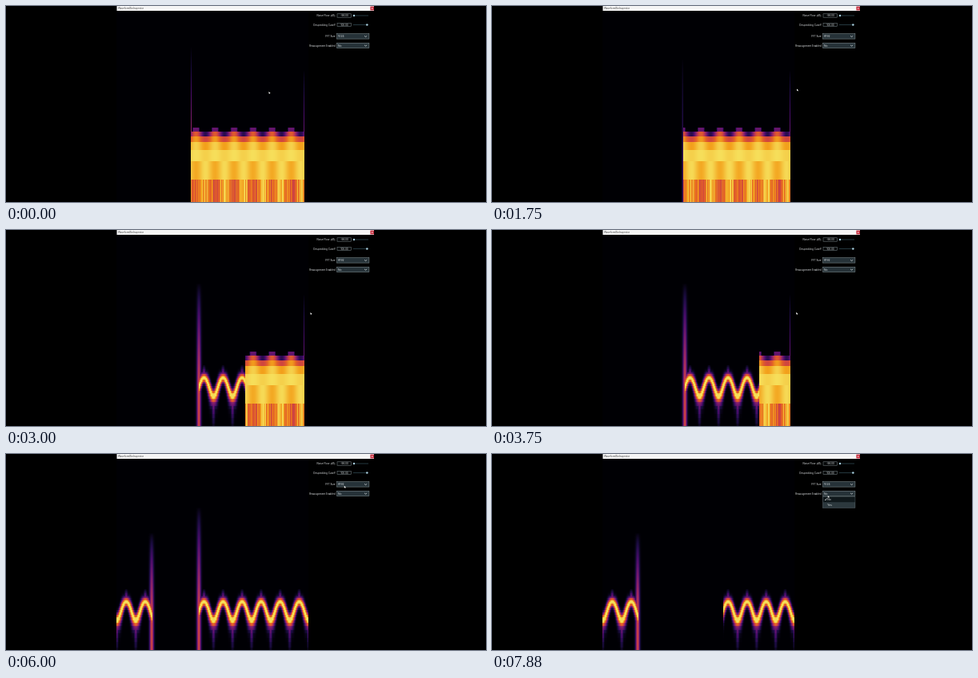
Write an HTML page with a canvas that moves like this. It is 600 px wide and 245 px high and loops after 8000 ms.

```html
<!DOCTYPE html>
<html lang="en">
<head>
<meta charset="utf-8">
<title>Spectrogram</title>
<style>
html, body { margin: 0; width: 100%; height: 100%; overflow: hidden; background: #000; }
canvas, svg { position: absolute; left: 0; top: 0; width: 600px; height: 245px; }
text { font: 3px Inter, "Open Sans", sans-serif; fill: #e4e8ea; }
.label { text-anchor: end; }
.value { text-anchor: middle; }
.item { font-size: 3.3px; }
.box { fill: #050708; stroke: #7d878b; stroke-width: .5; }
.combo { fill: #263238; stroke: #8a979c; stroke-width: .5; }
.menu { fill: #2c383d; stroke: #66747a; stroke-width: .5; }
.hover { fill: #10181b; }
.line { fill: none; stroke: #e4e8ea; stroke-width: .7; }
.track { stroke: #2f4751; stroke-width: .8; }
.knob { fill: #a9cfdf; }
</style>
</head>
<body>
<canvas id="plot" width="600" height="245"></canvas>
<svg id="ui" viewBox="0 0 600 245">
  <rect x="138.5" width="321.5" height="6" fill="#f5f5f5"/>
  <text x="140" y="4.1" style="fill:#444">WaveformBinInspector</text>
  <rect x="455.4" y=".6" width="4.6" height="4.8" fill="#c42b3c"/>
  <path d="M456.8 2l1.8 2m0-2l-1.8 2" stroke="#fff" stroke-width=".5"/>
</svg>
<script>
const STEP = 125, LOOP = 8000;
const LEFT = 138, RIGHT = 378, SPAN = RIGHT - LEFT, H = 245;
const PERIOD = 23.8;

// ---------- spectrogram ----------
const PALETTE = [[0, 0, 4], [27, 12, 65], [74, 12, 107], [120, 28, 109], [165, 44, 96],
  [205, 66, 66], [228, 98, 38], [243, 162, 28], [246, 222, 90]];
const clamp = (v, lo = 0, hi = 1) => Math.min(hi, Math.max(lo, v));
const mix = (a, b, p) => a + (b - a) * p;
const ramp = (y, from, len, power) => clamp((y - from) / len) ** power;
const bell = (d, width) => Math.exp(-((d / width) ** 2));
const swing = (x, peak) => Math.cos((x - peak) / PERIOD * 2 * Math.PI);
const noise = n => { const s = Math.sin(n * 91.7) * 4371.3; return s - Math.floor(s); };

function color(v) {
  const p = clamp(v) * (PALETTE.length - 1), i = Math.min(Math.floor(p), PALETTE.length - 2);
  return PALETTE[i].map((c, j) => mix(c, PALETTE[i + 1][j], p - i));
}

function paint(width, level) {
  const canvas = document.createElement('canvas');
  canvas.width = width;
  canvas.height = H;
  const ctx = canvas.getContext('2d'), image = ctx.createImageData(width, H);
  for (let y = 0; y < H; y++)
    for (let x = 0; x < width; x++)
      image.data.set([...color(level(LEFT + x, y)), 255], (y * width + x) * 4);
  ctx.putImageData(image, 0, 0);
  return canvas;
}

// top, level between peaks, level at peaks
const BANDS = [[217, .93, .72], [194, .99, .89], [180, .97, 1], [170, .87, .97],
  [163, .64, .86], [157, .16, .72]];

function coarse(x, y) {
  if (x < 231 || x > 372) return 0;
  const c = swing(x, 237);
  if (y < 157) {
    if (x === 231) return .46 * ramp(y, 50, 107, 1);
    if (x === 372) return .32 * ramp(y, 80, 77, .8);
    return y >= 152 ? .32 * ramp(c, .3, .4, 1) : 0;
  }
  const [top, low, high] = BANDS.find(b => y >= b[0]);
  const v = mix(low, high, .5 + .5 * c);
  return top === 217 ? v + (noise(x) - .6) * .22 : v;
}

const spike = (x, y, at, top, len) => .63 * ramp(y, top, len, .8) * bell(x - at, 2.5);

function fine(x, y) {
  let v = Math.max(spike(x, y, 240.6, 66, 125), spike(x, y, 421.6, 98, 100));
  if (x >= 241 && x < 423) {
    const c = swing(x, 247);
    const pitch = 12 * Math.exp((217 - y) / 52);
    const row = mix(pitch, Math.round(pitch), .6);
    const d = row - (18.5 + 4.1 * c);
    const core = 1.04 * bell(d, 2.4 * (1 + .6 * (1 - c * c)));
    const tail = Math.max(d > 0 ? c : -c, 0) ** 6;
    v = Math.max(v, core, .36 * tail * clamp(1.5 - Math.abs(d) / 5.6));
  }
  return v;
}

const before = paint(SPAN, coarse), after = paint(SPAN * 2, fine);
const plot = document.getElementById('plot').getContext('2d');

function copy(img, from, to, shift = 0) {
  if (to > from) plot.drawImage(img, from - LEFT, 0, to - from, H, from - shift, 0, to - from, H);
}

function drawPlot(n) {
  const head = Math.round(269 + 5.91 * (n - 19));
  plot.clearRect(0, 0, 600, H);
  copy(before, head, RIGHT);
  copy(after, Math.max(LEFT, head - SPAN), Math.min(head, RIGHT));
  copy(after, RIGHT, head, SPAN);
}

// ---------- controls ----------
const ui = document.getElementById('ui');
function add(tag, attrs, parent = ui, content = '') {
  const el = document.createElementNS('http://www.w3.org/2000/svg', tag);
  for (const key in attrs) el.setAttribute(key, attrs[key]);
  el.textContent = content;
  return parent.appendChild(el);
}
const write = (x, y, str, cls = '', parent = ui) => add('text', { x, y: y + 1.2, class: cls }, parent, str);
const rect = (x, y, width, height, cls, parent = ui) =>
  add('rect', { x, y, width, height, class: cls }, parent);

function slider(y, label, value, knob) {
  write(411.5, y, label, 'label');
  rect(414, y - 2.2, 17.7, 4.4, 'box');
  write(423, y, value, 'value');
  add('path', { d: `M434 ${y}H453`, class: 'track' });
  add('circle', { cx: knob, cy: y, r: 1.2, class: 'knob' });
}

function combo(y, label, value) {
  write(411.5, y, label, 'label');
  rect(413.7, y - 3.2, 40.2, 6.4, 'combo');
  add('path', { d: `M448 ${y - .6}l1.6 1.3l1.6 -1.3`, class: 'line' });
  return write(415, y, value, 'item');
}

const ROW = 6.6;
function menu(top, items) {
  const g = add('g', {});
  rect(413.7, top, 40.2, items.length * ROW + .8, 'menu', g);
  const hover = rect(414, top + .4, 39.6, ROW, 'hover', g);
  items.forEach((item, i) => write(419.3, top + .4 + ROW * (i + .5), item, 'item', g));
  add('path', { d: `M416 ${top + 3.8}l.9 1l1.5 -2.6`, class: 'line' }, g);
  return (open, y) => {
    g.style.display = open ? '' : 'none';
    const row = clamp(Math.floor((y - top) / ROW), 0, items.length - 1);
    hover.setAttribute('y', top + .4 + row * ROW);
  };
}

slider(12, 'Noise Floor (dB)', '-96.00', 435);
slider(23.5, 'Despeckling Cutoff', '100.00', 451.3);
const size = combo(37.9, 'FFT Size', '1024');
combo(49.4, 'Reassignment Enabled', 'No');
const sizeMenu = menu(41.3, ['1024', '2048', '4096', '8192']);
const modeMenu = menu(53.2, ['No', 'Yes']);
const cursor = add('path', { d: 'M0 0V2.7L.7 2.1L1.2 3.1L1.7 2.8L1.3 1.9H2.1Z', fill: '#fff' });

// step, x, y
const PATH = [[0, 328.5, 107], [4, 423, 39], [5, 423, 43], [7, 424.8, 67.8], [9, 424, 65],
  [14, 381, 103.5], [30, 380.3, 102.8], [37, 379.8, 102.8], [39, 380, 102.8], [43, 414, 42],
  [48, 422.8, 39.8], [51, 423.5, 45], [54, 423, 44.5], [58, 419.5, 49], [63, 419.8, 52]];

function pointer(n) {
  const i = Math.max(1, PATH.findIndex(p => p[0] >= n));
  const [a, x0, y0] = PATH[i - 1], [b, x1, y1] = PATH[i];
  const p = (n - a) / (b - a), e = p * p * (3 - 2 * p);
  return [mix(x0, x1, e), mix(y0, y1, e)];
}

// ---------- playback ----------
let shown = -1;
function render(t) {
  let n = Math.floor(t % LOOP / STEP);
  if (n === 53) n = 52; // brief hold
  if (n === shown) return;
  shown = n;
  drawPlot(n);
  const [x, y] = pointer(n);
  cursor.setAttribute('transform', `translate(${x} ${y})`);
  size.textContent = n >= 10 && n < 55 ? '8192' : '1024';
  sizeMenu(n >= 5 && n < 10 || n >= 49 && n < 55, y);
  modeMenu(n >= 61, y);
}

const start = performance.now();
(function tick() {
  render(performance.now() - start);
  requestAnimationFrame(tick);
})();
</script>
</body>
</html>
```
